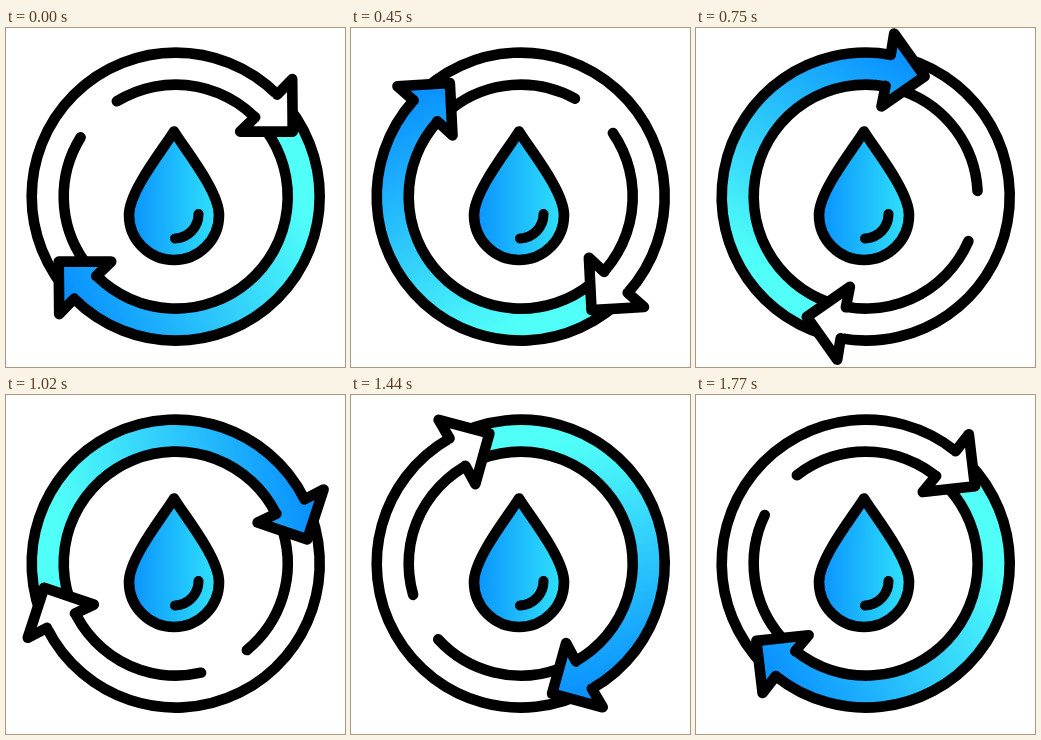
Write an HTML page that moves like this. It is 339 px wide and 339 px high and loops after 1.8 s.

```html
<!DOCTYPE html>
<html lang="en">
<head>
<meta charset="utf-8">
<title>Water cycle</title>
<style>
html, body { margin: 0; width: 100%; height: 100%; overflow: hidden; background: #fff; }
svg { display: block; width: 100vw; height: 100vh; }
.line { fill: none; stroke: #000; stroke-width: 10.6; stroke-linecap: round; stroke-linejoin: round; }
</style>
</head>
<body>
<svg viewBox="0 0 339 339">
  <defs>
    <linearGradient id="flow" gradientUnits="userSpaceOnUse" x1="-112" y1="84" x2="112" y2="-24">
      <stop offset="0" stop-color="#0a92ff"/>
      <stop offset="1" stop-color="#50fff8"/>
    </linearGradient>
    <linearGradient id="water" gradientUnits="userSpaceOnUse" x1="124" y1="0" x2="214" y2="0">
      <stop offset="0" stop-color="#0a92ff"/>
      <stop offset="1" stop-color="#30e4fa"/>
    </linearGradient>
    <path id="head" d="M-101.500 102L-116.500 117.500L-117 65L-64.500 65L-79.500 79.500"/>
    <path id="fill" d="M-101.500 102L-116.500 117.500L-117 65L-64.500 65L-79.500 79.500L-78 81L-100 103.500Z"/>
  </defs>
  <g id="wheel">
    <path id="band" fill="url(#flow)"/>
    <circle class="line" r="144"/>
    <path id="rim" class="line"/>
    <use href="#fill" fill="url(#flow)"/>
    <use href="#head" class="line"/>
    <g transform="rotate(180)">
      <use href="#fill" fill="#fff"/>
      <use href="#head" class="line"/>
    </g>
  </g>
  <path class="line" style="fill:url(#water)"
    d="M168 103.500C157 121.500 123 163 123 187A45 45 0 0 0 213 187C213 163 179 121.500 168 103.500Z"/>
  <path class="line" style="stroke-width:10" d="M192.500 186A24.500 24.500 0 0 1 169 210.500"/>
</svg>
<script>
const wheel = document.getElementById("wheel");
const LOOP = 1800, STEP = 30, HALF = 930;
const OUTER = 144, INNER = 112;

// Angles are clockwise degrees from the top.
function point(r, deg) {
  const a = deg * Math.PI / 180;
  return `${r * Math.sin(a)} ${-r * Math.cos(a)}`;
}

function arc(r, from, to, start = "M") {
  const large = Math.abs(to - from) > 180 ? 1 : 0;
  const sweep = to > from ? 1 : 0;
  return `${start}${point(r, from)}A${r} ${r} 0 ${large} ${sweep} ${point(r, to)}`;
}

// The band stops under the white arrowhead, short of its neck.
document.getElementById("band").setAttribute("d",
  arc(OUTER, 50, 225) + arc(INNER, 225, 50, "L") + "Z");
document.getElementById("rim").setAttribute("d",
  arc(INNER, -31.7, 225) + arc(INNER, 235, 301.9));

// The second half turn is slightly quicker than the first.
function angle(t) {
  return t < HALF ? 180 * t / HALF : 180 + 180 * (t - HALF) / (LOOP - HALF);
}

let start;
function draw(now) {
  start ??= now;
  const t = Math.floor((now - start) % LOOP / STEP) * STEP;
  wheel.setAttribute("transform", `translate(169.7 168.6) rotate(${angle(t)})`);
  requestAnimationFrame(draw);
}
requestAnimationFrame(draw);
</script>
</body>
</html>
```
